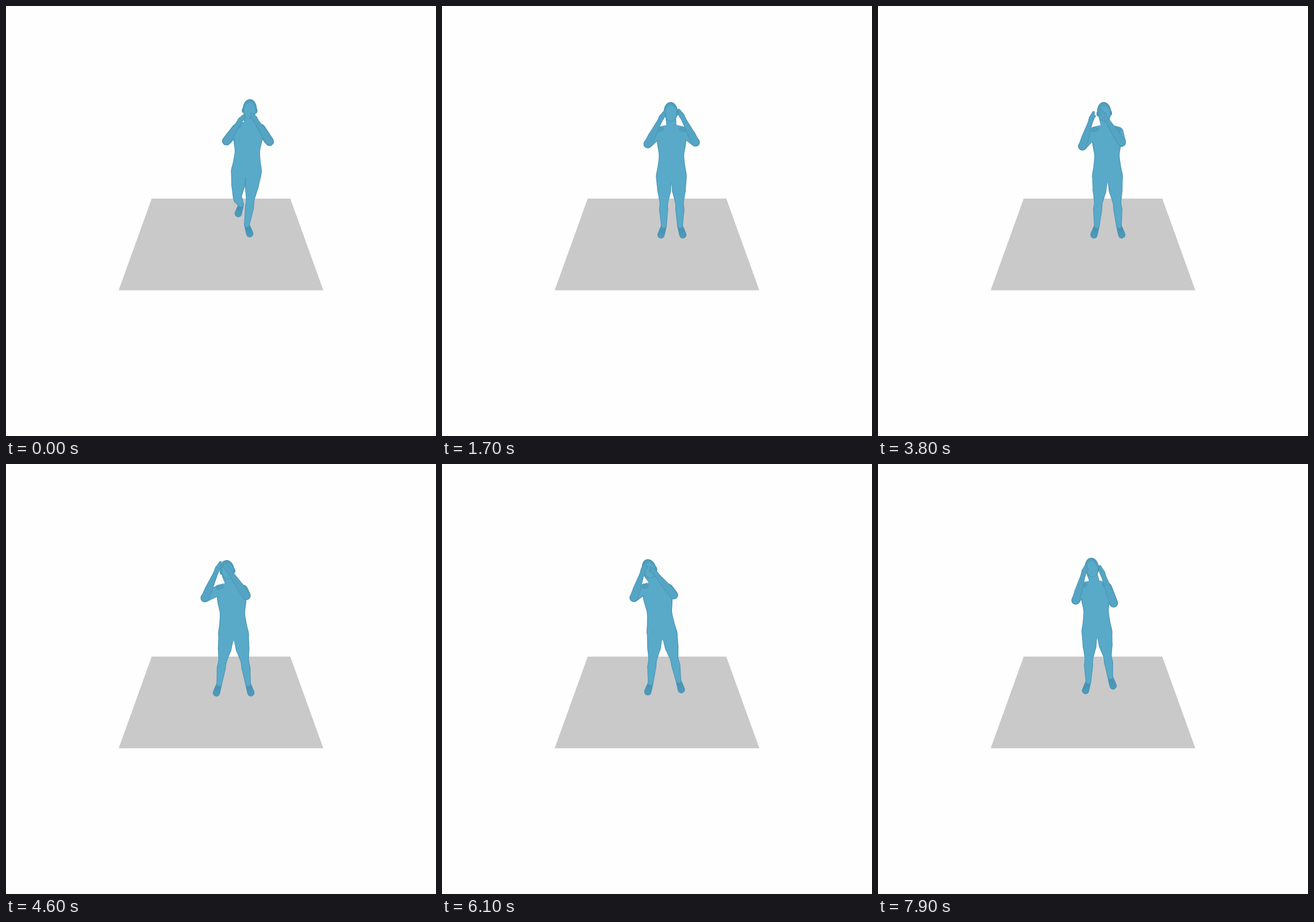
Animation, 748 px wide and 748 px high, one loop 8 s. Source, as an HTML page with a canvas:

```html
<!DOCTYPE html>
<html>
<head>
<meta charset="utf-8">
<style>
html, body { margin: 0; width: 100%; height: 100%; overflow: hidden; background: #fefefe; }
canvas { display: block; width: 100vw; height: 100vh; }
</style>
</head>
<body>
<canvas id="stage" width="748" height="748"></canvas>
<script>
const ctx = document.getElementById('stage').getContext('2d');
const LOOP = 8000, STEP = 100;
const SKIN = '#59a9c9', EDGE = '#4892b1', ARM = '#55a4c4', FLOOR = '#c9c9c9';

const mix = (a, b, u) => a + (b - a) * u;
const pt = (x, y) => ({ x, y });
const at = (p, dx, dy) => pt(p.x + dx, p.y + dy);
const lerp = (p, q, u) => pt(mix(p.x, q.x, u), mix(p.y, q.y, u));

// Progress of one movement, with gently eased ends
function ramp(t, from, to) {
  const u = Math.min(1, Math.max(0, (t - from) / (to - from)));
  return mix(u, u * u * (3 - 2 * u), 0.5);
}

// The pose is a base stance plus what each movement adds to it
function poseAt(t) {
  const land = ramp(t, 0, 900);
  const walk = ramp(t, 0, 1700);
  const turn = ramp(t, 1700, 3000);
  const step = ramp(t, 3300, 4600);
  const sway = ramp(t, 4600, 5400);
  const lift = ramp(t, 5400, 6900);
  const drop = ramp(t, 6900, 7900);
  const raise = 1 - land;

  const hip = pt(418 - 19 * walk + 2 * turn - 5 * step - 11 * sway - 4 * lift,
                 290 + 9 * walk - 4 * lift);
  const lean = 6 - 7 * walk - 2 * turn - 8 * step - 10 * sway + 9 * lift + 3 * drop
             - 6 * Math.sin(Math.PI * lift);
  const head = at(hip, lean, -111 - 4 * walk);
  const neck = pt((head.x + hip.x) / 2 + 1, head.y + 31);

  const arm = (s, elbowX, elbowY, tipX, tipY) => {
    const shoulder = at(neck, s * 20.5, 0);
    const elbow = at(shoulder, elbowX, elbowY), tip = at(head, tipX, tipY);
    return { s, shoulder, elbow, tip, wrist: lerp(elbow, tip, 0.69) };
  };
  const leg = (s, toe, up) => {
    const top = at(hip, s * 13, 1), ankle = at(toe, -s * 5, -15.5);
    const knee = at(lerp(top, ankle, 0.5), -5 * up, 14 * up);
    return { s, top, knee, ankle, toe };
  };

  return {
    hip, head, neck,
    waist: lerp(neck, hip, 0.53),
    tilt: 0.7 * Math.atan2(head.x - neck.x, neck.y - head.y),
    arms: [
      arm(-1,
        -18 - 3 * walk + 2 * turn - 6 * step + 6 * sway + lift + 5 * drop,
        25 + 10 * turn - 17 * step + 5 * sway - 8 * lift + 11 * drop,
        -11 - 11 * turn + 10 * step + 9 * sway - 7 * lift,
        12 - 12 * walk + 9 * turn - 22 * step + 12 * sway - 18 * lift + 15 * drop),
      arm(1,
        16 + 5 * walk - 15 * turn + 2 * sway + 4 * lift,
        26 - 4 * walk + 5 * turn - 13 * step + 2 * sway - 3 * lift + 18 * drop,
        3 + 11 * walk - 21 * turn + 4 * sway + 12 * lift + 5 * drop,
        8 - 11 * walk + 5 * turn - 15 * step + 11 * sway)
    ],
    legs: [
      leg(-1, pt(381 + 23 * raise - 15 * step - 8 * sway + 3 * drop,
                 398 - 37 * raise - 4 * lift), raise),
      leg(1, pt(424 - 5 * walk + 4 * turn + 3 * step - 6 * sway - 8 * lift - 3 * drop,
                396 + 2 * walk - 12 * lift), 0)
    ]
  };
}

// Rounded limb that tapers from one radius to the other
function limb(a, ra, b, rb) {
  const d = Math.hypot(b.x - a.x, b.y - a.y);
  ctx.beginPath();
  if (d <= Math.abs(ra - rb)) {
    const c = ra > rb ? a : b;
    ctx.arc(c.x, c.y, Math.max(ra, rb), 0, 7);
  } else {
    const dir = Math.atan2(b.y - a.y, b.x - a.x), off = Math.acos((ra - rb) / d);
    ctx.arc(a.x, a.y, ra, dir + off, dir + 2 * Math.PI - off);
    ctx.arc(b.x, b.y, rb, dir - off, dir + off);
  }
  ctx.fill();
}

function oval(c, rx, ry, turn = 0) {
  ctx.beginPath();
  ctx.ellipse(c.x, c.y, rx, ry, turn, 0, 2 * Math.PI);
  ctx.fill();
}

// Closed curve through the points
function smooth(pts) {
  const n = pts.length, p = i => pts[(i + n) % n];
  ctx.beginPath();
  ctx.moveTo(pts[0].x, pts[0].y);
  for (let i = 0; i < n; i++) {
    const a = p(i - 1), b = p(i), c = p(i + 1), d = p(i + 2);
    ctx.bezierCurveTo(b.x + (c.x - a.x) / 7, b.y + (c.y - a.y) / 7,
      c.x - (d.x - b.x) / 7, c.y - (d.y - b.y) / 7, c.x, c.y);
  }
  ctx.fill();
}

function torso(p, inset) {
  const side = ({ s, shoulder }) => {
    const w = at(p.waist, s * (22 - inset), 0);
    return [
      at(p.neck, s * (8 - inset), -8),
      at(shoulder, s * (4 - inset), -2 + inset),
      at(lerp(shoulder, w, 0.5), s * (4 - inset), 0),
      w,
      at(lerp(p.waist, p.hip, 0.5), s * (24 - inset), 0),
      at(p.hip, s * (26.5 - inset), 0),
      at(p.hip, s * 15, 14)
    ];
  };
  const [left, right] = p.arms;
  smooth([...side(left), at(p.hip, 0, 9), ...side(right).reverse()]);
}

function leg({ s, top, knee, ankle }, inset) {
  const thigh = at(lerp(top, knee, 0.5), -s * 0.5, 0);
  const calf = at(lerp(knee, ankle, 0.33), s * 0.5, 0);
  limb(top, 13.5 - inset, thigh, 11.8 - inset);
  limb(thigh, 11.8 - inset, knee, 7.4 - inset);
  limb(knee, 7.2 - inset, calf, 7.7 - inset);
  limb(calf, 7.7 - inset, ankle, 4.8 - inset);
}

function foot({ ankle, toe }) {
  const g = ctx.createLinearGradient(ankle.x, ankle.y - 4, toe.x, toe.y);
  g.addColorStop(0, SKIN);
  g.addColorStop(0.5, EDGE);
  g.addColorStop(1, '#4c99b9');
  ctx.fillStyle = g;
  limb(ankle, 4.8, toe, 6.4);
}

function forearm({ s, elbow, wrist, tip }, inset) {
  const palm = lerp(wrist, tip, 0.45), muscle = lerp(elbow, wrist, 0.35);
  limb(elbow, 7 - inset, muscle, 6.7 - inset);
  limb(muscle, 6.7 - inset, wrist, 4.2 - inset);
  limb(wrist, 4.2 - inset, palm, 4.8 - inset);
  limb(palm, 4.6 - inset, tip, 2.2 - inset);
  limb(palm, 2.6 - inset, at(lerp(wrist, tip, 0.75), -s * 4, 2), 1.7 - inset);
}

function body(p, inset, color) {
  ctx.fillStyle = color;
  for (const l of p.legs) leg(l, inset);
  torso(p, inset);
  for (const { shoulder, elbow } of p.arms) {
    limb(at(shoulder, 0, 4), 9 - inset, elbow, 7.6 - inset);
  }
  limb(at(p.head, 0, 10), 9 - inset, at(p.neck, 0, -4), 8.5 - inset);
}

function head(p) {
  ctx.save();
  ctx.translate(p.head.x, p.head.y);
  ctx.rotate(p.tilt);
  ctx.fillStyle = EDGE;
  for (const s of [-1, 1]) oval(pt(s * 11.7, 3), 1.8, 4);
  oval(pt(0, 0), 12.2, 17);
  ctx.fillStyle = '#509fbe';
  oval(pt(0, 0.3), 11.2, 15.5);
  ctx.fillStyle = SKIN;
  oval(pt(0, 3), 9.5, 13.5);
  ctx.restore();
}

function draw(t) {
  const p = poseAt(t);
  ctx.fillStyle = '#fefefe';
  ctx.fillRect(0, 0, 748, 748);
  ctx.fillStyle = FLOOR;
  ctx.beginPath();
  ctx.moveTo(253.5, 335);
  ctx.lineTo(494.5, 335);
  ctx.lineTo(552, 494.6);
  ctx.lineTo(196, 494.6);
  ctx.fill();

  p.legs.forEach(foot);
  body(p, 0, EDGE);
  body(p, 1, SKIN);

  ctx.fillStyle = EDGE;
  ctx.globalAlpha = 0.5;
  for (const { s, shoulder } of p.arms) oval(at(shoulder, -s, 0), 7, 4, s * 0.3);
  ctx.globalAlpha = 1;

  head(p);
  for (const a of p.arms) {
    ctx.fillStyle = EDGE;
    forearm(a, 0);
    ctx.fillStyle = ARM;
    forearm(a, 0.8);
  }
}

function tick(now) {
  draw(Math.floor((now % LOOP) / STEP) * STEP);
  requestAnimationFrame(tick);
}
draw(0);
requestAnimationFrame(tick);
</script>
</body>
</html>
```
